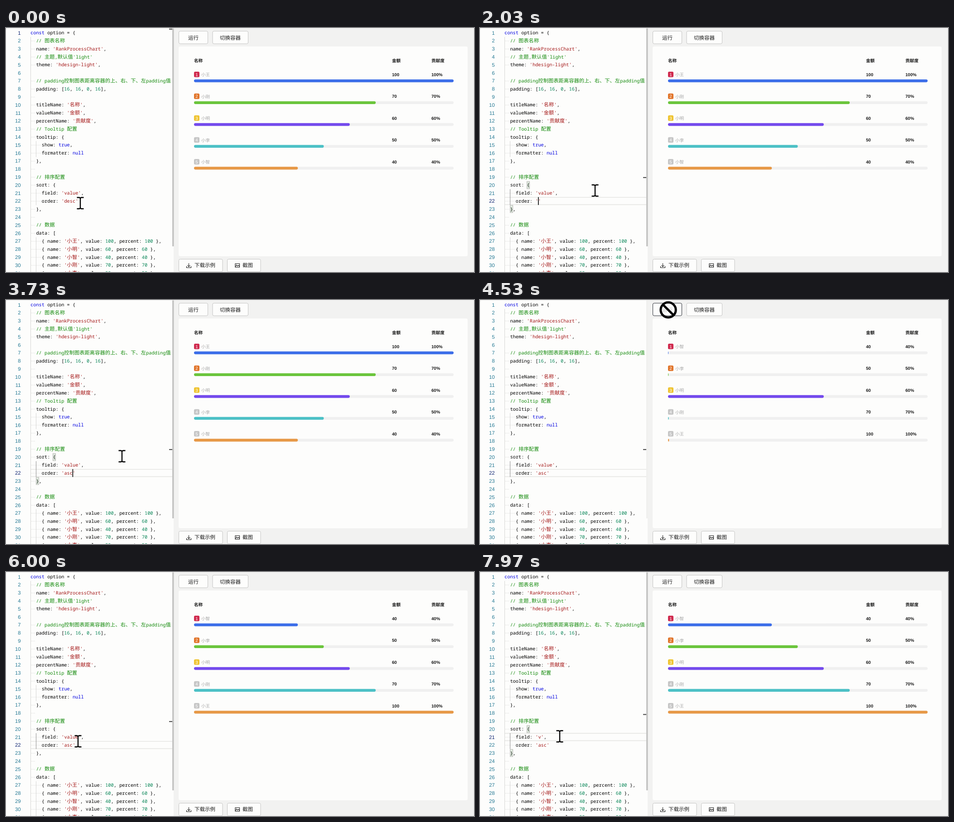
Recreate the animation shown at these times as an HTML page. Size 1033 by 542 pixels, loop 8000 ms.

```html
<!DOCTYPE html>
<html lang="zh-CN">
<head>
<meta charset="utf-8">
<title>Rank chart editor</title>
<style>
html, body { margin: 0; width: 100%; height: 100%; overflow: hidden; background: #f2f2f1; }
svg { display: block; width: 1033px; height: 542px; }
text { white-space: pre; text-rendering: geometricPrecision; font-family: "Liberation Sans", "Noto Sans CJK SC", "Noto Sans CJK", sans-serif; }
.code { font: 10.33px "Noto Sans Mono", "DejaVu Sans Mono", monospace; fill: #000; }
.code .cjk { font: 300 11.3px "Noto Sans CJK SC", "Noto Sans CJK", sans-serif; }
.comment { fill: #148a0c; }
.string { fill: #a31515; }
.number { fill: #098658; }
.word { fill: #0000e0; }
.lineno { font-size: 11.3px; text-anchor: end; fill: #237893; }
.lineno.on { fill: #0b216f; }
.dots { stroke: #c4c4c2; stroke-width: 1; stroke-dasharray: 1 2.1; }
.guide { stroke: #d6d6d4; stroke-width: 1; }
.btn { fill: #fdfdfc; stroke: #c4c4c3; }
.label { font-size: 11.5px; font-weight: 500; fill: #191919; }
.icon { fill: none; stroke: #191919; stroke-width: 1.1; }
.head, .value { font-size: 9.6px; font-weight: 700; fill: #191919; }
.name { font-size: 9.6px; fill: #a6a6a6; }
.rank { font-size: 9.6px; fill: #fff; text-anchor: middle; }
</style>
</head>
<body>
<svg viewBox="0 0 1033 542">
  <rect width="1033" height="542" fill="#f2f2f1"/>
  <path d="M0 542V6Q0 1 5 1H370V542Z" fill="#fdfdfc"/>
  <g id="rowMark" fill="none" stroke="#e6e6e4" stroke-width="1.6"><path d="M54 .8H370M54 17H370"/></g>
  <g id="editor"></g>
  <path id="scopeGuide" d="M66.5 358V393" stroke="#8f8f8f"/>
  <g id="brackets" fill="#006400" fill-opacity=".1" stroke="#b4b4b2">
    <rect x="103.5" y="341" width="6" height="16"/><rect x="66.5" y="394" width="6" height="16"/>
  </g>
  <rect id="caret" width="1.6" height="17.5"/>
  <rect id="rulerMark" x="360" width="10" height="2" fill="#424242"/>
  <rect x="367" y="1" width="3.5" height="484" fill="#f0f0ee"/>
  <rect id="slider" x="367" y="1" width="3.5" height="484" fill="#c3c3c2"/>

  <rect id="run" class="btn" x="381.5" y="7" width="64" height="28" rx="3"/>
  <text id="runLabel" class="label" x="402" y="25.7">运行</text>
  <rect class="btn" x="456" y="7" width="78.500" height="28" rx="3"/>
  <text class="label" x="472" y="25.7">切换容器</text>
  <rect x="381" y="41" width="638" height="466" rx="4" fill="#fdfdfc"/>
  <rect class="btn" x="381.5" y="513.500" width="96.500" height="28" rx="3"/>
  <path class="icon" d="M403.500 522.500V530M400.500 527.300L403.500 530.300L406.500 527.300M398.500 529V532.500H408.500V529"/>
  <text class="label" x="416" y="531.3">下载示例</text>
  <rect class="btn" x="488.500" y="513.500" width="73.500" height="28" rx="3"/>
  <path class="icon" d="M506 523.500H515.500V531.500H506ZM506 530L509 527L511 529L513 527L515.500 529.500M508 525.500H509"/>
  <text class="label" x="522" y="531.3">截图</text>
  <g id="chart"></g>

  <g id="mouse">
    <path id="beam" fill="none" stroke="#000" stroke-width="2.4" d="M-7.500 -12.500H-2L0 -11L2 -12.500H7.500M-7.500 12.500H-2L0 11L2 12.500H7.500M0 -11.500V11.500"/>
    <path id="arrow" d="M0 0V27L6 21L10 30L14.500 28L10.500 19.500H19Z" stroke="#fff"/>
    <g id="blocked" fill="none" stroke="#000" stroke-width="5"><circle r="16.700"/><path d="M-11.500 -11.500L11.500 11.500"/></g>
  </g>
</svg>
<script>
const LOOP = 8000, LEFT = 54, CHAR = 6.2, PITCH = 17.8;
const $ = id => document.getElementById(id);
const row = n => PITCH * (n - 1);

const people = { 小王: 100, 小明: 60, 小智: 40, 小刚: 70, 小李: 50 };
const source = `const option = {
  // 图表名称
  name: 'RankProcessChart',
  // 主题,默认值'light'
  theme: 'hdesign-light',

  // padding控制图表距离容器的上、右、下、左padding值
  padding: [16, 16, 0, 16],

  titleName: '名称',
  valueName: '金额',
  percentName: '贡献度',
  // Tooltip 配置
  tooltip: {
    show: true,
    formatter: null
  },

  // 排序配置
  sort: {
    field: 'value',
    order: 'desc'
  },

  // 数据
  data: [`.split('\n').concat(Object.entries(people).map(
  ([name, n]) => `    { name: '${name}', value: ${n}, percent: ${n} },`));

const cjk = s => s.replace(/[\u3000-\u9fff]+/g, '<tspan class="cjk">$&</tspan>');
const span = (cls, s) => `<tspan class="${cls}">${cjk(s)}</tspan>`;
const highlight = s => s.replace(/(\/\/.*)|('[^']*')|(\b\d+\b)|\b(const|true|null)\b/g,
  (m, comment, string, number) =>
    span(comment ? 'comment' : string ? 'string' : number ? 'number' : 'word', m));

function drawEditor() {
  $('editor').innerHTML = source.map((line, i) => {
    const n = i + 1, y = row(n);
    const indent = line ? line.search(/\S/) : n === 6 ? 0 : 2;
    const x = LEFT + indent * CHAR;
    let out = `<text class="lineno" id="no${n}" x="32.5" y="${y + 14.5}">${n}</text>`;
    if (n > 1) out += `<path class="guide" d="M54.500 ${y + 2}v${PITCH}"/>`;
    if (indent === 4) out += `<path class="guide" d="M66.500 ${y + 2}v${PITCH}"/>`;
    if (indent) out += `<path class="dots" d="M56 ${y + 11}H${x - 1}"/>`;
    return out + `<text class="code" id="line${n}" x="${x}" y="${y + 14.1}">${highlight(line.trim())}</text>`;
  }).join('');
}

const barColors = ['#3b6de9', '#6bc53c', '#744aed', '#4dc1c6', '#e79846'];
const rankColors = ['#d02b4f', '#e1752b', '#efc432', '#c6c6c6', '#c6c6c6'];
const ranking = dir => Object.entries(people).sort((a, b) => dir * (a[1] - b[1]));
const ascending = ranking(1), descending = ranking(-1);
const BAR_X = 415, BAR_W = 573;

function drawChart() {
  const head = [['名称', 415], ['金额', 852], ['贡献度', 939]]
    .map(([s, x]) => `<text class="head" x="${x}" y="76.3">${s}</text>`).join('');
  $('chart').innerHTML = head + barColors.map((color, i) => {
    const y = 103.3 + 48.5 * i;
    return `<rect x="415" y="${y - 6.2}" width="12" height="12.2" rx="2.5" fill="${rankColors[i]}"/>
      <text class="rank" x="421" y="${y + 3.4}">${i + 1}</text>
      <text class="name" id="name${i}" x="431" y="${y + 3.7}"></text>
      <text class="value" id="value${i}" x="852" y="${y + 3.5}"></text>
      <text class="value" id="percent${i}" x="939" y="${y + 3.5}"></text>
      <rect x="${BAR_X}" y="${y + 10.9}" width="${BAR_W}" height="6.2" rx="3.1" fill="#f0f0f0"/>
      <rect id="bar${i}" x="${BAR_X}" y="${y + 10.9}" height="6.2" rx="3.1" fill="${color}"/>`;
  }).join('');
}

// Timeline, in ms
const CLICK_ORDER = 350, CLICK_RUN = 4300, REDRAW = 4400, GROW = 4530, GROW_TIME = 720;
const ENABLE = 5000, BLUR_RUN = 5850, CLICK_FIELD = 6080;
const orderSteps = [[0, 'desc'], [1000, 'des'], [1200, 'de'], [1400, 'd'], [1600, ''],
  [2700, 'a'], [3000, 'as'], [3300, 'asc']];
const fieldSteps = [[0, 'value'], [6700, 'valu'], [6950, 'val'], [7150, 'va'], [7350, 'v']];
const mousePath = [[0, 164, 389], [300, 156, 385], [650, 156, 385], [1250, 254, 361],
  [3400, 254, 361], [3700, 256, 347], [3780, 256, 347], [4200, 415.5, 22], [5060, 415.5, 22],
  [5300, 284.5, 285], [5600, 159, 376], [6010, 159, 376], [6070, 160, 368],
  [6600, 160, 368], [7200, 176, 365], [LOOP, 176, 365]];

const clamp = v => Math.min(1, Math.max(0, v));
const ramp = (t, from, to) => clamp((t - from) / (to - from));
const stepAt = (steps, t) => steps.filter(s => s[0] <= t).pop();
const show = (id, on) => $(id).setAttribute('visibility', on ? 'visible' : 'hidden');
const set = (id, key, v) => $(id).setAttribute(key, v);
const write = (id, s) => { if ($(id).textContent !== s) $(id).textContent = s; };
const writeCode = (n, s) => { if ($('line' + n).textContent !== s) $('line' + n).innerHTML = highlight(s); };

function mouseAt(t) {
  const i = mousePath.findIndex(p => p[0] > t);
  const [t0, x0, y0] = mousePath[i - 1], [t1, x1, y1] = mousePath[i];
  const u = ramp(t, t0, t1), e = u * u * (3 - 2 * u);
  return [x0 + (x1 - x0) * e, y0 + (y1 - y0) * e];
}

function renderEditor(t) {
  const line = t < CLICK_ORDER ? 1 : t < CLICK_FIELD ? 22 : 21;
  const focused = line === 21 || (line === 22 && t < CLICK_RUN);
  const [edited, word] = stepAt(line === 21 ? fieldSteps : orderSteps, t);
  const since = t - Math.max(edited, line === 21 ? CLICK_FIELD : CLICK_ORDER);
  writeCode(21, `field: '${stepAt(fieldSteps, t)[1]}',`);
  writeCode(22, `order: '${stepAt(orderSteps, t)[1]}'`);
  for (const n of [1, 21, 22]) $('no' + n).classList.toggle('on', n === line);
  show('rowMark', line > 1);
  set('rowMark', 'transform', `translate(0 ${row(line) + 1.6})`);
  show('scopeGuide', line > 1);
  show('brackets', focused);
  show('caret', focused && Math.floor(since / 500) % 2 === 0);
  set('caret', 'x', LEFT + (12 + word.length) * CHAR - 0.4);
  set('caret', 'y', row(line) + 1.8);
  set('rulerMark', 'y', 1.5 + 15.7 * (line - 1));
  set('slider', 'opacity', t < 5000 ? 1 - ramp(t, 4050, 4500) : ramp(t, 5310, 5400));
}

function renderChart(t) {
  const rows = t < REDRAW ? descending : ascending;
  const grown = t < REDRAW ? 1 : 1 - (1 - ramp(t, GROW, GROW + GROW_TIME)) ** 3;
  rows.forEach(([name, n], i) => {
    write('name' + i, name);
    write('value' + i, String(n));
    write('percent' + i, n + '%');
    set('bar' + i, 'width', BAR_W * n / 100 * (i === 2 ? 1 : grown));
  });
}

function renderPointer(t) {
  const [x, y] = mouseAt(t);
  const busy = t >= CLICK_RUN && t < ENABLE;
  set('run', 'style', t >= CLICK_RUN && t < BLUR_RUN ? 'stroke:#2b2e36' : '');
  set('runLabel', 'style', busy ? 'fill:#c2c2c2' : '');
  set('mouse', 'transform', `translate(${x} ${y})`);
  show('beam', x < 370);
  show('blocked', busy);
  show('arrow', x >= 370 && !busy);
}

drawEditor();
drawChart();
const start = performance.now();
function frame() {
  const t = (performance.now() - start) % LOOP;
  renderEditor(t);
  renderChart(t);
  renderPointer(t);
  requestAnimationFrame(frame);
}
frame();
</script>
</body>
</html>
```
